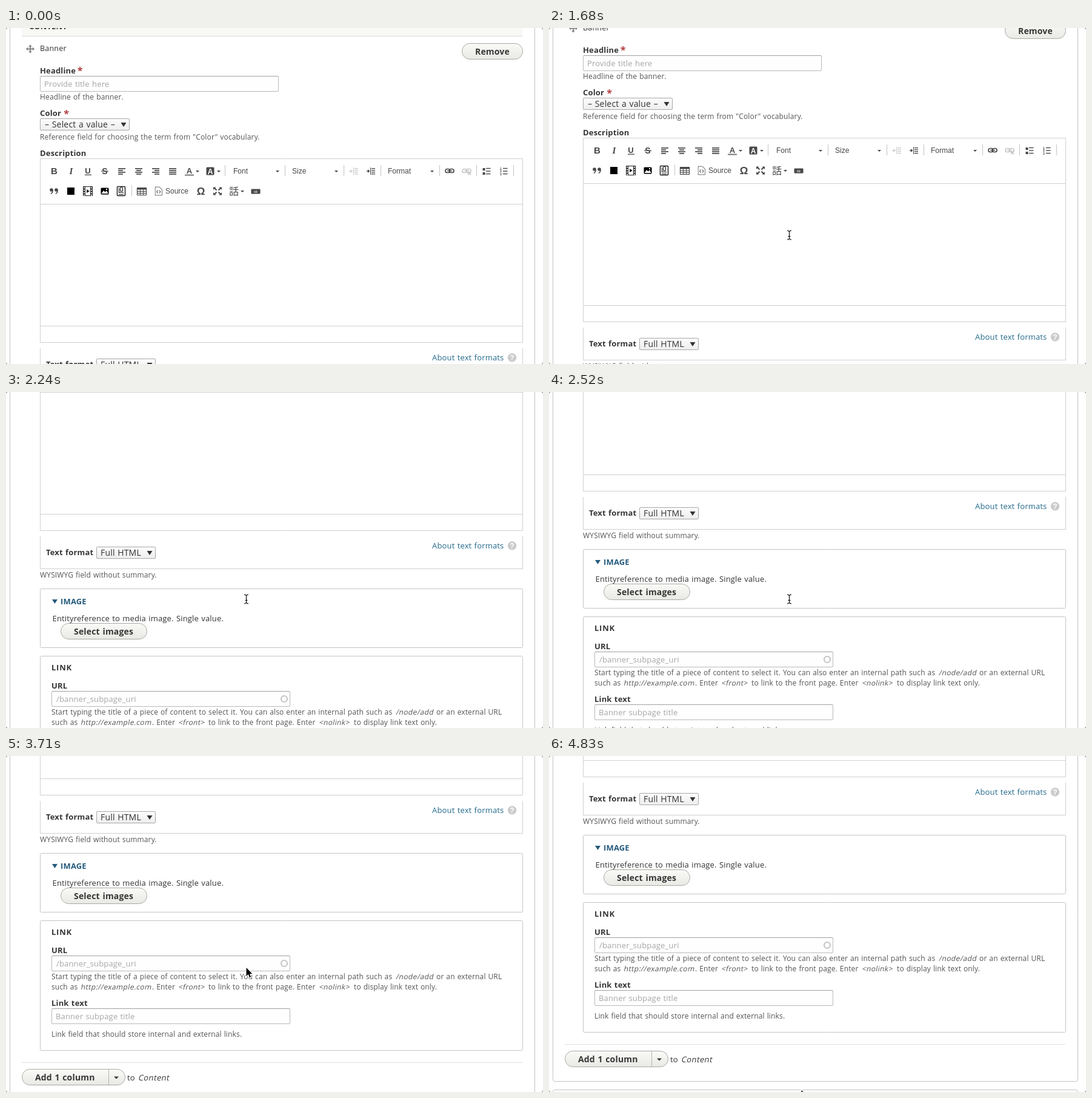
Write an HTML page with a canvas that moves like this. It is 886 px wide and 554 px high and loops after 4.9 s.

```html
<!DOCTYPE html>
<html lang="en">
<head>
<meta charset="utf-8">
<title>Banner form</title>
<style>
html, body { margin: 0; width: 100%; height: 100%; overflow: hidden; background: #fff; }
canvas { display: block; width: 886px; height: 554px; }
</style>
</head>
<body>
<canvas id="stage"></canvas>
<script>
const W = 886, H = 554, LOOP = 4900, STEP = 70;
const canvas = document.getElementById('stage');
const ctx = canvas.getContext('2d');
const dpr = window.devicePixelRatio || 1;
canvas.width = W * dpr;
canvas.height = H * dpr;

const SANS = '"Open Sans", "Noto Sans", sans-serif';
const ARIAL = '"Liberation Sans", Arial, sans-serif';
const INK = '#333', LABEL = '#363636', HELP = '#545454', GHOST = '#a6a6a6';
const ICON = '#474747', LINE = '#d0d0d0', BOX = '#c4c4c4', BLUE = '#246a8c';

// [time, value...] points, joined linearly
const scrollKeys = [
  [1190, 0], [1400, 5], [1540, 15], [1680, 34], [1750, 62], [1820, 115],
  [1890, 185], [1960, 240], [2030, 273], [2100, 288], [2170, 290], [2240, 290],
  [2310, 295], [2380, 310], [2520, 355], [2730, 380], [3010, 389], [3290, 389],
  [3430, 405], [3570, 437], [3710, 454], [3850, 473], [3920, 479], [4060, 484]
];
const enterKeys = [[280, 408, 447], [350, 399, 372], [420, 396, 341]];

function track(keys, t, i = 1) {
  if (t <= keys[0][0]) return keys[0][i];
  for (let k = 1; k < keys.length; k++) {
    const a = keys[k - 1], b = keys[k];
    if (t <= b[0]) return a[i] + (b[i] - a[i]) * (t - a[0]) / (b[0] - a[0]);
  }
  return keys[keys.length - 1][i];
}

function type(str, x, y, size = 13, color = INK, style = '', tracking = 0.0125) {
  ctx.font = `${style} ${size}px ${SANS}`;
  ctx.letterSpacing = size * tracking + 'px';
  ctx.wordSpacing = size * 0.055 + 'px';
  ctx.fillStyle = color;
  ctx.fillText(str, x, y);
  ctx.letterSpacing = ctx.wordSpacing = '0px';
}
const bold = (str, x, y, size = 13, color = LABEL) => type(str, x, y, size, color, 'bold');
const help = (str, x, y) => type(str, x, y, 12, HELP);

// the slanted face is the upright one, sheared
function slant(str, x, y, size = 12, color = HELP) {
  ctx.save();
  ctx.transform(1, 0, -0.2, 1, x, y);
  type(str, 0, 0, size, color, '', 0.03);
  ctx.restore();
}

function glyph(str, x, y, font, color = ICON) {
  ctx.font = font;
  ctx.fillStyle = color;
  ctx.textAlign = 'center';
  ctx.fillText(str, x, y);
  ctx.textAlign = 'left';
}

function rect(x, y, w, h, color) {
  ctx.fillStyle = color;
  ctx.fillRect(x, y, w, h);
}
const hline = (x1, x2, y, color = LINE) => rect(x1, y, x2 - x1, 1, color);
const vline = (x, y1, y2, color = LINE) => rect(x, y1, 1, y2 - y1, color);

function frame(x, y, w, h, r, stroke, fill, lw = 1) {
  ctx.beginPath();
  ctx.roundRect(x + 0.5, y + 0.5, w - 1, h - 1, r);
  if (fill) { ctx.fillStyle = fill; ctx.fill(); }
  if (stroke) { ctx.strokeStyle = stroke; ctx.lineWidth = lw; ctx.stroke(); }
}

function poly(points, fill, stroke, lw = 1) {
  ctx.beginPath();
  points.forEach(([x, y]) => ctx.lineTo(x, y));
  ctx.closePath();
  if (stroke) { ctx.strokeStyle = stroke; ctx.lineWidth = lw; ctx.stroke(); }
  if (fill) { ctx.fillStyle = fill; ctx.fill(); }
}

function path(points, color, lw) {
  ctx.beginPath();
  points.forEach(([x, y], i) => i ? ctx.lineTo(x, y) : ctx.moveTo(x, y));
  ctx.strokeStyle = color;
  ctx.lineWidth = lw;
  ctx.stroke();
}

function ring(x, y, r, color, lw) {
  ctx.beginPath();
  ctx.arc(x, y, r, 0, 7);
  ctx.strokeStyle = color;
  ctx.lineWidth = lw;
  ctx.stroke();
}

const caret = (x, y, w, h, color = ICON) =>
  poly([[x - w / 2, y - h / 2], [x + w / 2, y - h / 2], [x, y + h / 2]], color);

function shade(y, h, top, bottom) {
  const g = ctx.createLinearGradient(0, y, 0, y + h);
  g.addColorStop(0, top);
  g.addColorStop(1, bottom);
  return g;
}

function button(str, x, y, w, h, tx) {
  frame(x, y, w, h, h / 2, '#a8a8a4', shade(y, h, '#fafaf8', '#e8e8e4'));
  bold(str, tx, y + h / 2 + 5, 14);
}

function select(str, x, y, w, tx) {
  frame(x, y, w, 20, 1.5, '#a9a9a9', shade(y, 20, '#fdfdfd', '#ededed'));
  type(str, tx, y + 15, 14);
  caret(x + w - 10, y + 10.5, 9, 7, '#333');
}

function input(str, x, y, tx) {
  frame(x, y, 394, 26, 1.5, '#b9b9b9', '#fefefe');
  hline(x + 1, x + 393, y, '#a2a2a2');
  type(str, tx, y + 17.5, 13, GHOST);
}

const star = (x, y) => glyph('*', x, y + 7, `bold 16px ${SANS}`, '#b03a3a');

function moveIcon(x, y) {
  const c = '#858585';
  rect(x - 5, y - 1, 10, 2, c);
  rect(x - 1, y - 5, 2, 10, c);
  for (let i = 0; i < 4; i++) {
    ctx.save();
    ctx.translate(x, y);
    ctx.rotate(i * Math.PI / 2);
    poly([[0, -7], [3, -4], [-3, -4]], c);
    ctx.restore();
  }
}

function bars(x, y, align) {
  [12, 8, 12, 8].forEach((len, i) => {
    const w = align === 'full' ? 12 : len;
    const dx = align === 'center' ? (12 - w) / 2 : align === 'right' ? 12 - w : 0;
    rect(x - 6 + dx, y - 5 + i * 3, w, 1.7, ICON);
  });
}

function indent(x, y, dir, color) {
  [-5, -2, 1, 4].forEach(d => rect(x + 1, y + d, 6, 1.3, color));
  vline(x - 1, y - 6, y + 6, color);
  rect(x - 7, y - 0.7, 5, 1.4, color);
  const tip = dir > 0 ? x - 2 : x - 7.5;
  poly([[tip, y], [tip - dir * 3, y - 3], [tip - dir * 3, y + 3]], color);
}

function chain(x, y, color) {
  frame(x - 7.5, y - 3.5, 8.5, 7, 3, color, null, 1.7);
  frame(x - 1, y - 3.5, 8.5, 7, 3, color, null, 1.7);
  rect(x - 4, y - 0.7, 8, 1.4, color);
}

function list(x, y, numbered) {
  for (let i = 0; i < 3; i++) {
    const ly = y - 4.5 + i * 4.5;
    if (numbered) glyph(i + 1, x - 4.5, ly + 2, `bold 5px ${ARIAL}`);
    else if (i !== 1) rect(x - 6.5, ly - 1.5 + (i ? -1 : 1), 4, 4, ICON);
    rect(x - 1, ly - 0.7, 7.5, 1.4, ICON);
  }
}

function toolbarTop(y) {
  const sep = x => vline(x, y - 10, y + 8, '#c4c4c4');
  const menu = (str, x, arrowX) => {
    ctx.font = `12px ${ARIAL}`;
    ctx.fillStyle = ICON;
    ctx.fillText(str, x, y + 4);
    caret(arrowX, y + 0.5, 6, 3);
  };
  glyph('B', 79.5, y + 5, `bold 15px ${ARIAL}`);
  glyph('I', 107.5, y + 5, 'italic bold 15px "Liberation Serif", serif');
  glyph('U', 135, y + 4, `bold 13px ${ARIAL}`);
  rect(130, y + 5.5, 11, 1.3, ICON);
  glyph('S', 163, y + 5, `bold 14px ${ARIAL}`);
  rect(157, y - 0.5, 12, 1.2, ICON);
  ['left', 'center', 'right', 'full'].forEach((a, i) => bars(191 + i * 28, y, a));
  glyph('A', 302.5, y + 4, `bold 13px ${ARIAL}`);
  rect(295, y + 5.5, 15, 2, '#777');
  caret(316, y + 0.5, 6, 3);
  frame(330, y - 7, 14, 14, 1.5, null, ICON);
  glyph('A', 337, y + 4.5, `bold 12px ${ARIAL}`, '#fff');
  caret(351, y + 0.5, 6, 3);
  menu('Font', 375, 448);
  menu('Size', 472, 545);
  menu('Format', 630, 703);
  indent(574, y, -1, '#c9c9c9');
  indent(602, y, 1, ICON);
  chain(732, y - 0.5, ICON);
  chain(760, y - 0.5, '#c9c9c9');
  path([[762, y + 1], [767, y + 6]], '#c0c0c0', 1.5);
  path([[767, y + 1], [762, y + 6]], '#c0c0c0', 1.5);
  list(793, y, false);
  list(821, y, true);
  [361, 460, 557, 618, 715, 776, 837].forEach(sep);
}

function toolbarBottom(y) {
  [75, 83].forEach(x => {
    ctx.beginPath();
    ctx.arc(x, y - 2, 2.8, 0, 7);
    ctx.fillStyle = ICON;
    ctx.fill();
    path([[x + 2, y - 2], [x + 1.6, y + 2], [x - 1, y + 4.5]], ICON, 1.6);
  });
  rect(101, y - 6, 12, 12, '#000');

  // film strip
  rect(127, y - 8, 16, 16, '#222');
  rect(131, y - 7, 8, 14, '#fff');
  for (let i = 0; i < 4; i++) {
    rect(128, y - 6.5 + i * 4, 2, 2, '#fff');
    rect(140, y - 6.5 + i * 4, 2, 2, '#fff');
  }
  poly([[133, y - 3], [138, y], [133, y + 3]], '#222');

  // picture
  frame(156, y - 6, 14, 12, 1.5, null, '#000');
  poly([[157.5, y + 4], [161, y - 1], [163.5, y + 1.5], [166, y - 1], [168.5, y + 4]], '#fff');
  rect(165, y - 4, 2, 2, '#fff');

  // document with clip
  frame(183, y - 8, 14, 16, 1, '#222', '#fff', 1.5);
  frame(188, y - 7, 5, 8, 2, '#222', null, 1.2);
  [2, 5].forEach(d => hline(186, 194, y + d, '#222'));
  vline(186, y - 5, y + 2, '#222');

  vline(207, y - 10, y + 8, '#c4c4c4');

  // table
  frame(216, y - 6, 16, 13, 0.5, ICON, '#fff', 1.2);
  rect(216, y - 6, 16, 3.5, ICON);
  [221, 226].forEach(x => vline(x, y - 3, y + 7, ICON));
  [0, 3].forEach(d => hline(216, 232, y + d, ICON));

  // page with angle brackets
  poly([[246.5, y - 6.5], [253, y - 6.5], [257, y - 2.5], [257, y + 6.5], [246.5, y + 6.5]], '#fff', ICON, 1.4);
  path([[250.5, y - 1.5], [248.7, y + 1], [250.5, y + 3.5]], ICON, 1.1);
  path([[253, y - 1.5], [254.8, y + 1], [253, y + 3.5]], ICON, 1.1);
  ctx.font = `12px ${ARIAL}`;
  ctx.fillStyle = ICON;
  ctx.fillText('Source', 263, y + 4);

  glyph('Ω', 321.5, y + 6, `bold 17px ${ARIAL}`);

  // four outward arrows
  for (const sx of [-1, 1]) for (const sy of [-1, 1]) {
    const at = (a, b) => [349 + sx * a, y + sy * b];
    poly([at(7, 6.5), at(2.5, 6.5), at(7, 2)], ICON);
    path([at(1.5, 1.5), at(5, 5)], ICON, 2);
  }

  glyph('話', 376, y + 6, '16px "Noto Sans CJK JP", "Noto Sans CJK SC", sans-serif');
  caret(390, y + 0.5, 6, 3);
  frame(404, y - 4, 16, 9, 1, null, ICON);
  glyph('Hi', 412, y + 3, `bold 6px ${ARIAL}`, '#ddd');
}

function drawPage() {
  // outer panels
  frame(6, -20, 867, 1041, 3, '#c2c2c2', '#fff');
  frame(6, 1034, 867, 60, 3, '#c2c2c2', '#fff');

  rect(26, -20, 826, 33, '#f8f8f5');
  hline(26, 852, 13, '#dcdcd6');
  bold('CONTENT', 38, 1.5);
  moveIcon(40, 34.5);
  type('Banner', 56, 37.5, 12.6);
  button('Remove', 752, 25, 101, 27, 774);

  bold('Headline', 56, 74.5);
  star(122, 69);
  input('Provide title here', 56, 79, 63);
  help('Headline of the banner.', 56, 118);

  bold('Color', 56, 145);
  star(99.5, 139.5);
  select('– Select a value –', 56, 149, 148, 64);
  help('Reference field for choosing the term from "Color" vocabulary.', 56, 183.5);

  // rich text editor
  bold('Description', 56, 210.5);
  frame(56, 215, 797, 304, 0, LINE, '#fff');
  hline(56, 853, 290);
  hline(56, 853, 491);
  toolbarTop(236);
  toolbarBottom(269);

  vline(56, 528, 582);
  vline(852, 528, 582);
  hline(56, 853, 581);
  bold('Text format', 66, 559);
  select('Full HTML', 149, 545, 98, 156);
  type('About text formats', 703, 548, 13, BLUE);
  ctx.beginPath();
  ctx.arc(835, 543.5, 7.2, 0, 7);
  ctx.fillStyle = '#cbcbcb';
  ctx.fill();
  glyph('?', 835, 548, `bold 12px ${ARIAL}`, '#fff');
  help('WYSIWYG field without summary.', 56, 596);

  // image
  frame(56, 614, 797, 98, 2, BOX, '#fff');
  caret(80.5, 635.5, 9, 7, '#255a7b');
  bold('IMAGE', 90, 639.5, 13, '#255a7b');
  type('Entityreference to media image. Single value.', 76.5, 668);
  button('Select images', 90, 671, 143, 27, 112);

  // link
  frame(56, 725, 797, 215, 2, BOX, '#fff');
  type('LINK', 75, 749, 13, LABEL, 'bold', 0.06);
  bold('URL', 75, 779);
  input('/banner_subpage_uri', 75, 783, 83);
  ring(459, 796, 5, '#c6c6c6', 2.2);
  help('Start typing the title of a piece of content to select it. You can also enter an internal path such as', 75, 822);
  slant('/node/add', 643, 822);
  help('or an external URL', 710, 822);
  help('such as', 75, 838.5);
  slant('http://example.com', 123, 838.5);
  help('. Enter', 241, 838.5);
  slant('<front>', 284, 838.5);
  help('to link to the front page. Enter', 334, 838.5);
  slant('<nolink>', 516, 838.5);
  help('to display link text only.', 574, 838.5);
  bold('Link text', 75, 865.5);
  input('Banner subpage title', 75, 870, 82);
  help('Link field that should store internal and external links.', 75, 916.5);

  hline(26, 852, 959, '#e0e0dc');
  button('Add 1 column', 26, 970, 171, 27, 48);
  vline(169, 971, 996, '#b4b4b0');
  caret(182, 984.5, 8, 4, '#333');
  type('to', 200, 988.5);
  slant('Content', 218, 988.5, 13, INK);
}

function arrow(x, y) {
  const shape = [[0, 0], [0, 14], [3.2, 11], [5.5, 16.2], [7.7, 15.2], [5.4, 10.2], [9.8, 10.2]];
  poly(shape.map(([a, b]) => [x + a, y + b]), '#000', '#fff', 2);
}

function beam(x, y) {
  const strokes = [[[x, y - 6], [x, y + 6]], [[x - 2, y + 2], [x + 2, y + 2]]];
  for (const s of [-1, 1]) strokes.push([[x - 3.5, y + s * 7.5], [x - 1.5, y + s * 7.2], [x, y + s * 5.8], [x + 1.5, y + s * 7.2], [x + 3.5, y + s * 7.5]]);
  strokes.forEach(s => path(s, '#fff', 3));
  strokes.forEach(s => path(s, '#111', 1.2));
}

function drawCursor(t) {
  if (t < 280) return;
  if (t < 700) return arrow(track(enterKeys, t, 1), track(enterKeys, t, 2));
  if (t < 3150) return beam(396.5, 341.5);
  const p = Math.min(1, Math.max(0, (t - 4270) / 560));
  const e = p * p * (3 - 2 * p);
  arrow(396.5 + 20 * e, 349 + 202 * e);
}

function drawCorners() {
  ctx.fillStyle = '#8c8c8c';
  ctx.beginPath();
  ctx.rect(0, 0, W, H);
  ctx.roundRect(0, 0, W, H, 4);
  ctx.fill('evenodd');
}

function draw() {
  const t = Math.floor(performance.now() % LOOP / STEP) * STEP;
  ctx.setTransform(dpr, 0, 0, dpr, 0, 0);
  rect(0, 0, W, H, '#fff');
  ctx.save();
  ctx.translate(0, -Math.round(track(scrollKeys, t)));
  drawPage();
  ctx.restore();
  drawCursor(t);
  drawCorners();
  requestAnimationFrame(draw);
}
draw();
</script>
</body>
</html>
```
